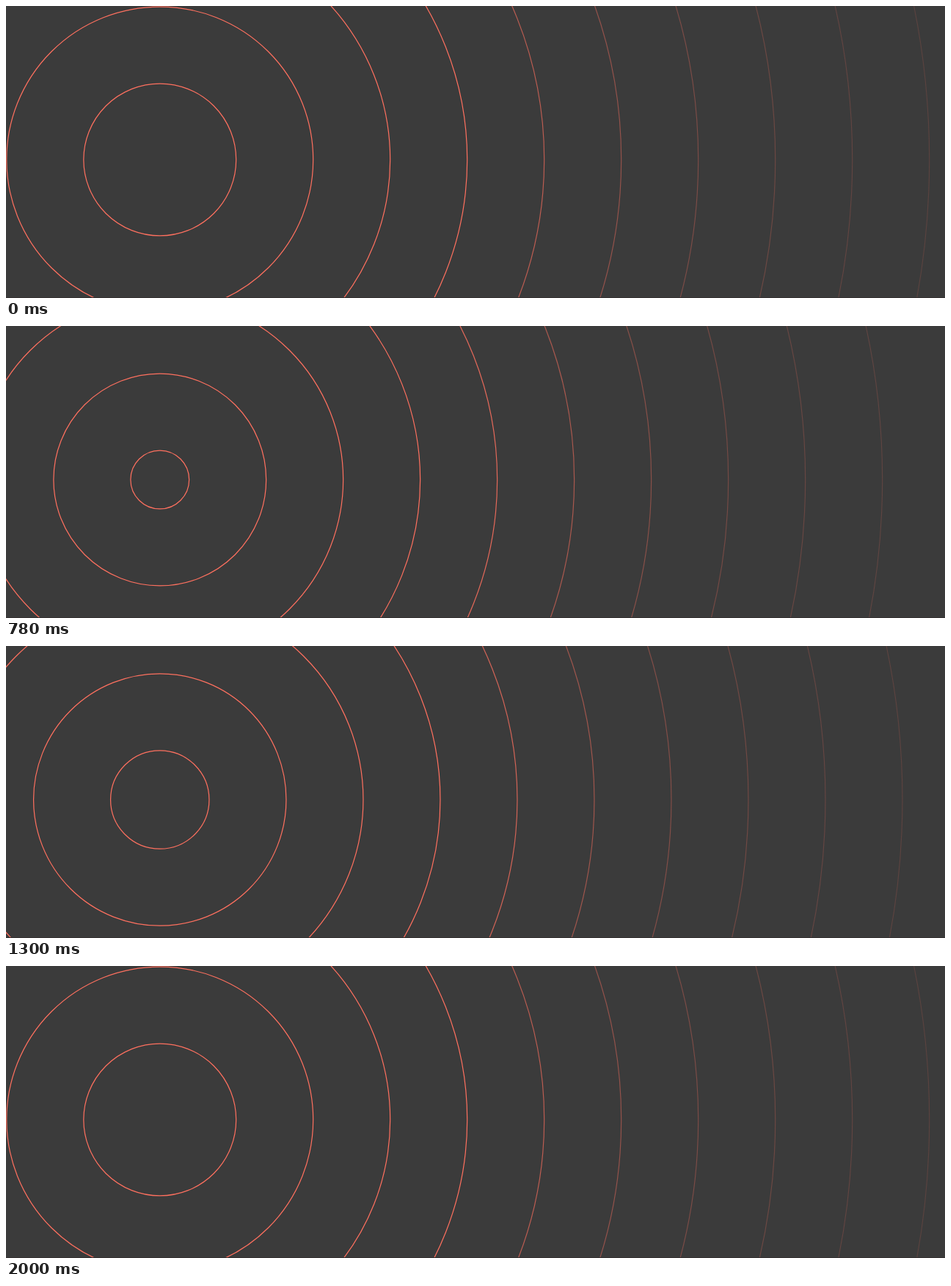
Write an HTML page that moves like this. It is 1280 px wide and 399 px high and loops after 2.02 s.

```html
<!DOCTYPE html>
<html lang="en">
<head>
<meta charset="utf-8">
<title>Ripples</title>
<style>
  html, body { margin: 0; width: 100%; height: 100%; overflow: hidden; background: #3b3b3b; }
  svg { display: block; width: 100%; height: 100%; }
</style>
</head>
<body>
<svg viewBox="0 0 1280 399" preserveAspectRatio="none">
  <rect width="1280" height="399" fill="#3b3b3b"/>
  <g id="rings" fill="none" stroke="#ff705f" stroke-width="1.2"></g>
  <rect y="398" width="1280" height="1" fill="#353131"/>
</svg>
<script>
  const LOOP = 2020, STEP = 20, STEPS = 100;
  const COUNT = 10, GAP = 105, SOLID = 430;
  const group = document.getElementById('rings');

  const rings = Array.from({ length: COUNT }, () => {
    const ring = document.createElementNS('http://www.w3.org/2000/svg', 'circle');
    ring.setAttribute('cx', 209.75);
    ring.setAttribute('cy', 210);
    group.appendChild(ring);
    return ring;
  });

  // Rings fade with distance once they pass the solid zone.
  const fade = r => r <= SOLID ? 1 : Math.pow(SOLID / r, 2.1);

  function draw(time) {
    const tick = Math.floor((time % LOOP) / STEP);
    const phase = (tick + STEPS - 1) % STEPS / STEPS;
    rings.forEach((ring, i) => {
      const r = (i + phase) * GAP;
      ring.setAttribute('r', r.toFixed(2));
      ring.setAttribute('stroke-opacity', fade(r).toFixed(3));
    });
  }

  function frame() {
    draw(performance.now());
    requestAnimationFrame(frame);
  }
  frame();
</script>
</body>
</html>
```
